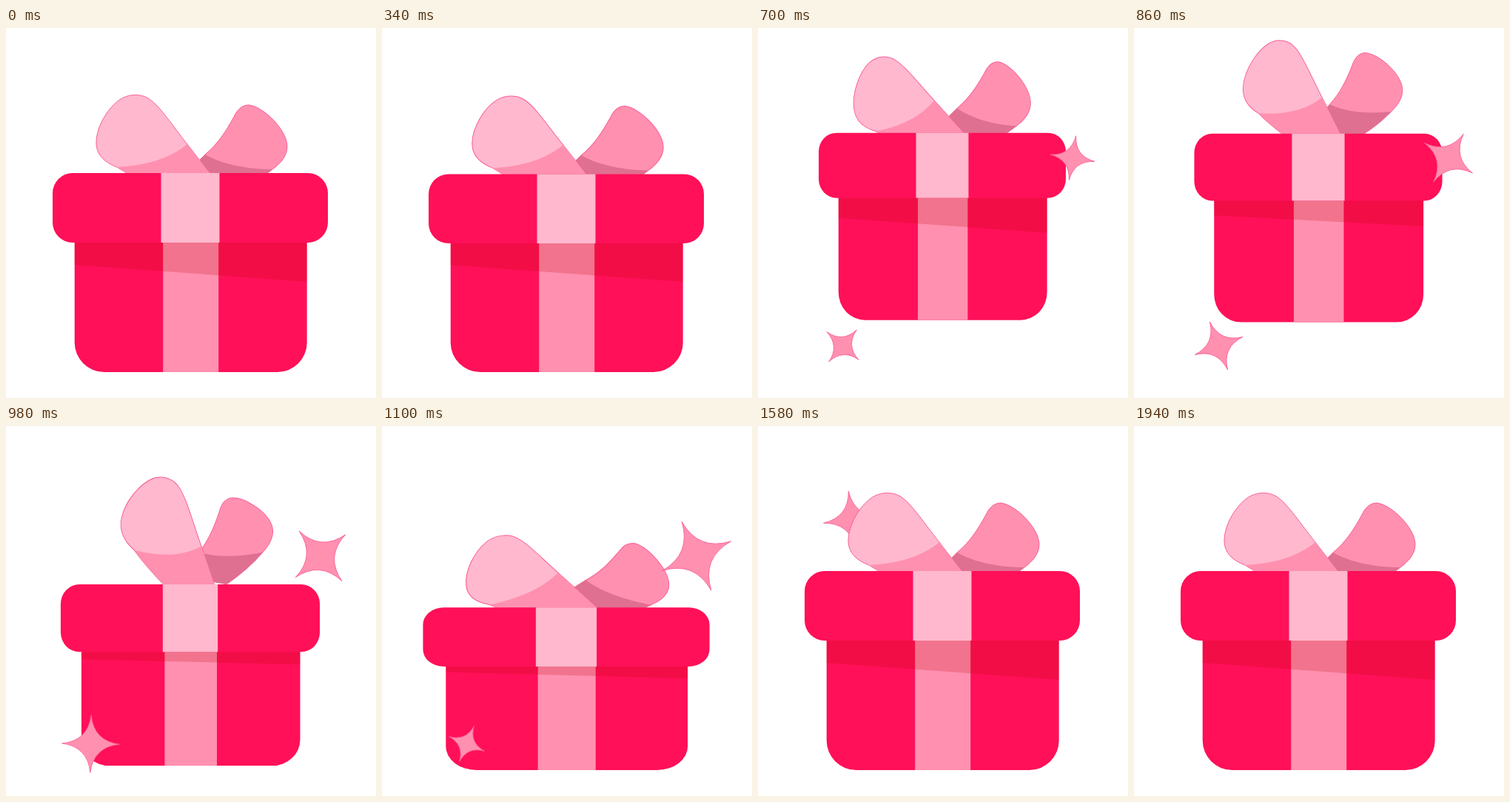
Write an HTML page with a canvas that moves like this. It is 500 px wide and 500 px high and loops after 2 s.

```html
<!DOCTYPE html>
<html lang="en">
<head>
<meta charset="utf-8">
<title>Gift box</title>
<style>
  html, body { margin: 0; height: 100%; overflow: hidden; background: #fff; }
  canvas { display: block; width: 100vw; height: 100vh; }
</style>
</head>
<body>
<canvas id="stage" width="500" height="500"></canvas>
<script>
const ctx = document.getElementById('stage').getContext('2d');
const LOOP = 2000, LID_CENTER = 249, BODY_CENTER = 249.7;
const RED = '#ff1058', LIGHT = '#ffb8ce', PINK = '#ff90b0', ROSE = '#df7091',
      EDGE = '#fa5c98', SHADOW = 'rgba(190, 0, 0, 0.2)';

// box:   half width, lid top, lid bottom, body bottom, shade left, shade right
// left:  loop top, shade start, shade end; right: the same, mirrored
const rest = { box: [186, 196, 290, 465, 320, 343],
  left: [176, 91, 150, 188, 245, 157], right: [326, 104, 360, 191, 269, 171] };
const crouch = { box: [186, 244, 323, 463, 331, 337],
  left: [160, 143, 149, 232, 238, 191], right: [338, 154, 362, 234, 275, 205] };
const rise = { box: [167, 142, 230, 395, 257, 277],
  left: [168, 40, 159, 140, 238, 98], right: [323, 46, 349, 133, 269, 109] };
const peak = { box: [166, 120, 208, 372, 231, 249],
  left: [186, 5, 164, 103, 246, 73], right: [316, 17, 348, 99, 267, 83] };
const fall = { box: [175, 213.6, 305, 459, 315, 322],
  left: [219, 71, 173, 167, 264, 162], right: [302, 97, 347, 170, 261, 170] };
const squash = { box: [194, 248, 327, 465, 333, 340],
  left: [165, 150, 146, 243, 240, 200], right: [338, 160, 364, 243, 274, 210] };
const settle = { box: [187, 200, 293, 465, 322, 345],
  left: [153, 118, 143, 210, 232, 167], right: [346, 126, 363, 213, 279, 178] };

const keys = [[0, rest], [320, rest], [520, crouch], [700, rise], [790, peak],
  [980, fall], [1080, squash], [1220, settle], [1360, rest], [LOOP, rest]];

const stars = [
  { x: 114.5, y: 429.5, radius: 39, start: 470, spin: 0.178 },
  { x: 425, y: 175.7, radius: 53, start: 640, spin: 0.145 },
  { x: 127, y: 126.5, radius: 41, start: 1127, spin: 0.183 }
];

const leftLoop = new Path2D('M245 157C225 132 209 107 195 97C185 89 168 88 155 96' +
  'C138 107 122 133 122 155C122 172 134 182 150 188C165 198 192 212 214 222L300 228Z');
const leftShade = new Path2D('M245 157C222 176 190 186 150 188C165 198 192 212 214 222L300 228Z');
const rightLoop = new Path2D('M269 171C286 157 297 140 308 120C313 109 320 104 328 104' +
  'C348 106 380 138 380 160C380 173 371 183 360 191C345 203 325 215 300 225L240 200Z');
const rightShade = new Path2D('M269 171C292 184 325 191 360 191C345 203 325 215 300 225L240 200Z');

// Monotone cubic interpolation: smooth through the keys, no overshoot.
function sample(t, part, i) {
  const value = k => keys[k][1][part][i];
  const slope = k => (value(k + 1) - value(k)) / (keys[k + 1][0] - keys[k][0]);
  const tangent = k => {
    if (k === 0 || k === keys.length - 1) return 0;
    const a = slope(k - 1), b = slope(k);
    return a * b > 0 ? 2 * a * b / (a + b) : 0;
  };
  let k = 0;
  while (t >= keys[k + 1][0]) k++;
  const span = keys[k + 1][0] - keys[k][0], u = (t - keys[k][0]) / span;
  const ease = u * u * (3 - 2 * u);
  return value(k) + (value(k + 1) - value(k)) * ease +
    span * u * (1 - u) * ((1 - u) * tangent(k) - u * tangent(k + 1));
}

const pose = (t, part) => rest[part].map((_, i) => sample(t, part, i));

// Affine map that carries the unit triangle to three points.
const frameOf = ([ax, ay, bx, by, cx, cy]) =>
  new DOMMatrix([bx - ax, by - ay, cx - ax, cy - ay, ax, ay]);

function fillRect(color, x1, y1, x2, y2) {
  ctx.fillStyle = color;
  ctx.fillRect(x1, y1, x2 - x1, y2 - y1);
}

function drawLoop(t, part, outline, color, shade, shadeColor) {
  const m = frameOf(pose(t, part)).multiply(frameOf(rest[part]).inverse());
  ctx.save();
  ctx.transform(m.a, m.b, m.c, m.d, m.e, m.f);
  ctx.fillStyle = color;
  ctx.fill(outline);
  ctx.strokeStyle = EDGE;
  ctx.lineWidth = 1;
  ctx.stroke(outline);
  ctx.fillStyle = shadeColor;
  ctx.fill(shade);
  ctx.restore();
}

function drawBody([half, , lidBottom, bottom, shadeLeft, shadeRight]) {
  const scale = half / 186, w = 157 * scale, ribbon = 37.5 * scale;
  const height = bottom - lidBottom, corner = { x: 40 * scale, y: 40 * height / 175 };
  const left = BODY_CENTER - w, right = BODY_CENTER + w;
  ctx.fillStyle = RED;
  ctx.beginPath();
  ctx.roundRect(left, lidBottom - 1, 2 * w, height + 1, [0, 0, corner, corner]);
  ctx.fill();
  fillRect(PINK, BODY_CENTER - ribbon, lidBottom - 1, BODY_CENTER + ribbon, bottom);

  ctx.fillStyle = SHADOW;
  ctx.beginPath();
  ctx.moveTo(left, lidBottom - 1);
  ctx.lineTo(right, lidBottom - 1);
  ctx.lineTo(right, shadeRight);
  ctx.lineTo(left, shadeLeft);
  ctx.fill();
}

function drawLid([half, top, bottom]) {
  const scale = half / 186, ribbon = 39.5 * scale, height = bottom - top;
  ctx.fillStyle = RED;
  ctx.beginPath();
  ctx.roundRect(LID_CENTER - half, top, 2 * half, height, { x: 27 * scale, y: 27 * height / 94 });
  ctx.fill();
  fillRect(LIGHT, LID_CENTER - ribbon, top, LID_CENTER + ribbon, bottom);
}

// Quick pop, slow growth, then a smooth shrink.
function starSize(age) {
  if (age <= 0 || age >= 820) return 0;
  if (age < 50) return 0.56 * age / 50;
  if (age < 510) return 0.56 + 0.44 * (age - 50) / 460;
  return (1 + Math.cos(Math.PI * (age - 510) / 310)) / 2;
}

function drawStar(t, { x, y, radius, start, spin }) {
  const age = t - start, r = radius * starSize(age), waist = 0.1 * r;
  if (!r) return;
  ctx.save();
  ctx.translate(x, y);
  ctx.rotate(age * spin * Math.PI / 180);
  ctx.beginPath();
  ctx.moveTo(0, -r);
  ctx.quadraticCurveTo(waist, -waist, r, 0);
  ctx.quadraticCurveTo(waist, waist, 0, r);
  ctx.quadraticCurveTo(-waist, waist, -r, 0);
  ctx.quadraticCurveTo(-waist, -waist, 0, -r);
  ctx.fillStyle = PINK;
  ctx.fill();
  ctx.strokeStyle = EDGE;
  ctx.lineWidth = 0.8;
  ctx.stroke();
  ctx.restore();
}

function draw(t) {
  const box = pose(t, 'box');
  fillRect('#fff', 0, 0, 500, 500);
  drawStar(t, stars[2]);
  drawBody(box);
  drawLoop(t, 'right', rightLoop, PINK, rightShade, ROSE);
  drawLoop(t, 'left', leftLoop, LIGHT, leftShade, PINK);
  drawLid(box);
  drawStar(t, stars[0]);
  drawStar(t, stars[1]);
}

const begin = performance.now();
function tick() {
  draw((performance.now() - begin) % LOOP);
  requestAnimationFrame(tick);
}
tick();
</script>
</body>
</html>
```
